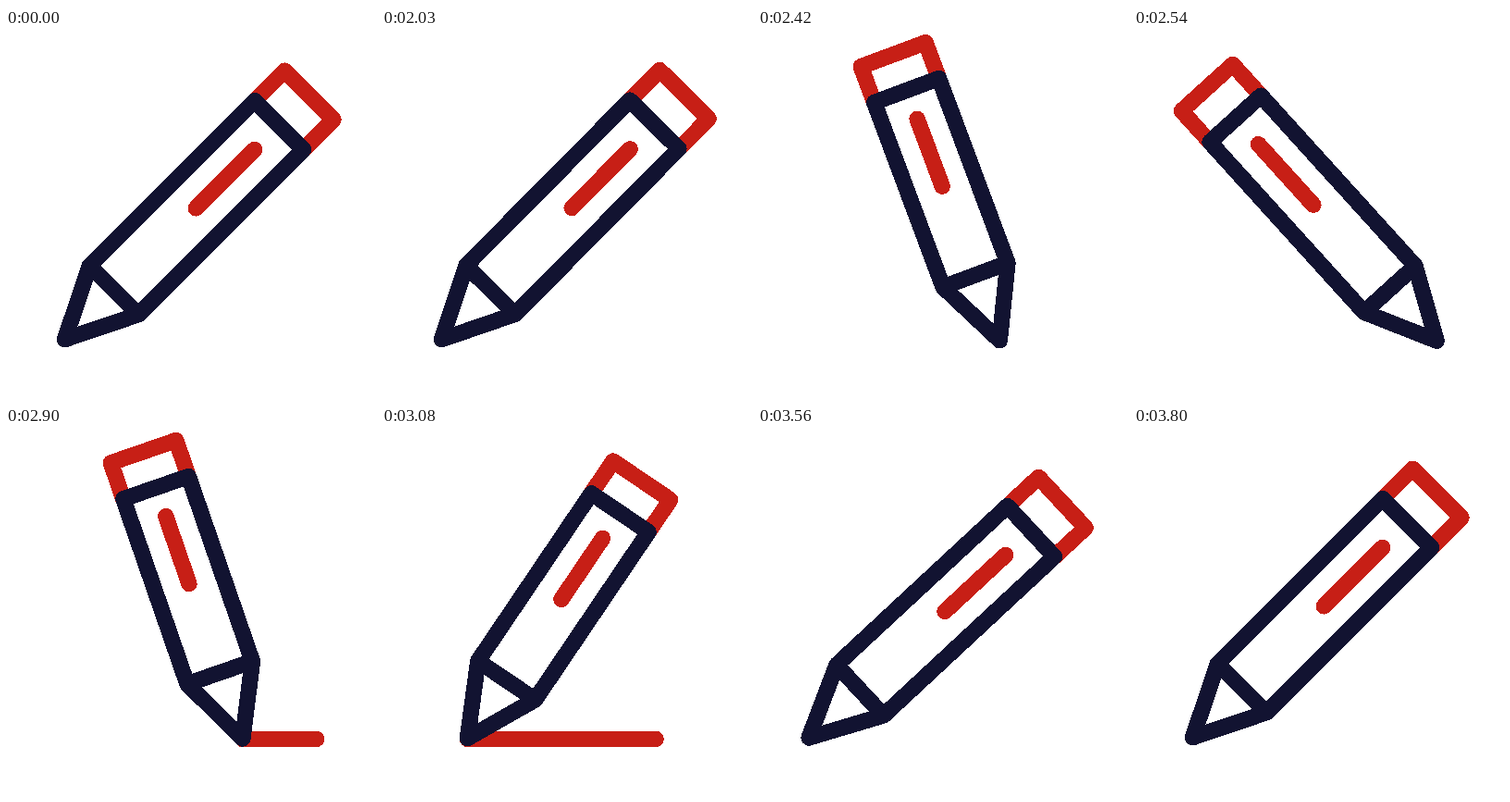
An HTML page that plays this animation: 400x400 px, repeating every 3830 ms.

```html
<!DOCTYPE html>
<html lang="en">
<head>
<meta charset="utf-8">
<title>Pencil</title>
<style>
  html, body { margin: 0; width: 100%; height: 100%; overflow: hidden; background: #fff; }
  svg { display: block; width: 100vw; height: 100vh; }
  path {
    fill: none; stroke-width: 17.4; stroke-linecap: round; stroke-linejoin: round;
    shape-rendering: crispEdges;
  }
  .red { stroke: #c71f16; }
  .navy { stroke: #121331; }
</style>
</head>
<body>
<svg viewBox="0 0 400 400">
  <path id="line" class="red"/>
  <g id="pencil">
    <path id="eraser" class="red"/>
    <path id="stripe" class="red"/>
    <path id="body" class="navy"/>
  </g>
</svg>
<script>
const LOOP = 3830, STEP = 30, PHASE = 20;
const HALF = 37.3, BASE = 75.5;

// Cubic Bezier easing with end heights 0 and 1
function bezier(x1, x2) {
  return u => {
    let lo = 0, hi = 1, s = u;
    for (let i = 0; i < 24; i++) {
      s = (lo + hi) / 2;
      const r = 1 - s;
      const x = 3 * r * r * s * x1 + 3 * r * s * s * x2 + s * s * s;
      if (x < u) lo = s; else hi = s;
    }
    return s * s * (3 - 2 * s);
  };
}
const smooth = u => u * u * (3 - 2 * u);
const steep = bezier(0.5, 0.5);

// Each row: time, values, easing used to arrive there
const pose = [
  [2000, [63.5, 336.7, 45]],
  [2600, [335.6, 338.2, -45], bezier(0.52, 0.667)],
  [2750, [335.6, 338.2, -45]],
  [3250, [43.4, 337.4, 50], bezier(0.333, 0.48)],
  [3810, [63.5, 336.7, 45], smooth]
];
const squash = [
  [2000, [0]], [2318, [1], steep], [2600, [0], steep],
  [2750, [0]], [2965, [1], smooth], [3250, [0], smooth]
];
const tail = [[2960, [335.6]], [3480, [43.4], smooth]];

function at(rows, t) {
  if (t <= rows[0][0]) return rows[0][1];
  for (let i = 1; i < rows.length; i++) {
    const [t0, a] = rows[i - 1], [t1, b, ease = smooth] = rows[i];
    if (t < t1) {
      const p = ease((t - t0) / (t1 - t0));
      return a.map((v, k) => v + (b[k] - v) * p);
    }
  }
  return rows[rows.length - 1][1];
}

const el = id => document.getElementById(id);
const [line, pencil, eraser, stripe, body] =
  ["line", "pencil", "eraser", "stripe", "body"].map(el);

function draw(t) {
  const [x, y, angle] = at(pose, t);
  const [k] = at(squash, t);
  const top = 327.7 - 52 * k, end = 373.6 - 58 * k;

  // The pencil stands on its tip at the origin
  pencil.setAttribute("transform", `translate(${x} ${y}) rotate(${angle})`);
  eraser.setAttribute("d", `M${-HALF} ${-top}V${-end}H${HALF}V${-top}`);
  stripe.setAttribute("d", `M0 ${46 * k - 290.3}V${30 * k - 200.5}`);
  body.setAttribute("d",
    `M0 0L${-HALF} ${-BASE}V${-top}H${HALF}V${-BASE}ZM${-HALF} ${-BASE}H${HALF}`);

  const head = t < 3250 ? x : 43.4;
  const [back] = at(tail, t);
  const shown = t > 2750 && back - head > 0.5;
  line.setAttribute("d", shown ? `M${head} 338.5H${back}` : "");
}

const start = performance.now();
function tick() {
  const t = (performance.now() - start) % LOOP;
  draw(Math.floor((t - PHASE) / STEP) * STEP + PHASE);
  requestAnimationFrame(tick);
}
tick();
</script>
</body>
</html>
```
